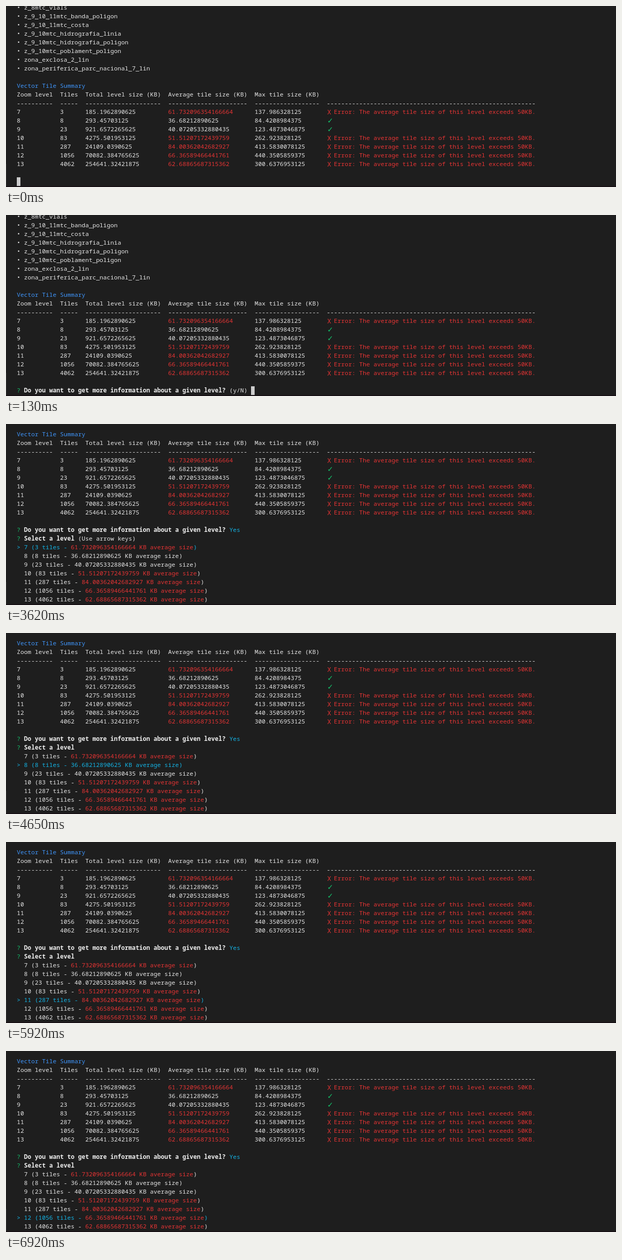
Animation of 1185x354 px, one loop 8000 ms. Source, as an HTML page with a canvas:

```html
<!DOCTYPE html>
<html lang="en">
<head>
<meta charset="utf-8">
<title>Vector Tile Summary</title>
<style>
  html, body { margin: 0; width: 100%; height: 100%; overflow: hidden; background: #1e1e1e; }
  canvas { display: block; }
</style>
</head>
<body>
<canvas id="term" width="1185" height="354"></canvas>
<script>
const ctx = document.getElementById('term').getContext('2d');
const LOOP = 8000, CELL = 7, LINE = 17, LEFT = 21, TOP = -5, BASE = 12;
const FONT = '11.667px "Noto Sans Mono", "DejaVu Sans Mono", monospace';
const C = { bg: '#1e1e1e', fg: '#e6e6e6', bold: '#eeeeee', red: '#e63434', green: '#14c46c',
            blue: '#3f95fa', cyan: '#14b4e6', cursor: '#cccccc', edge: '#181216', side: '#333333' };

const layers = ['z_8mtc_vials', 'z_9_10_11mtc_banda_poligon', 'z_9_10_11mtc_costa',
  'z_9_10mtc_hidrografia_linia', 'z_9_10mtc_hidrografia_poligon',
  'z_9_10mtc_poblament_poligon', 'zona_exclosa_2_lin', 'zona_periferica_parc_nacional_7_lin'];

const columns = [[0, 'Zoom level'], [12, 'Tiles'], [19, 'Total level size (KB)'],
  [42, 'Average tile size (KB)'], [66, 'Max tile size (KB)']];
const STATUS = 86;

// zoom, tiles, total, average, max
const levels = [
  '7 3 185.1962890625 61.732096354166664 137.986328125',
  '8 8 293.45703125 36.68212890625 84.4208984375',
  '9 23 921.6572265625 40.07205332880435 123.4873046875',
  '10 83 4275.501953125 51.51207172439759 262.923828125',
  '11 287 24109.0390625 84.00362042682927 413.5830078125',
  '12 1056 70082.384765625 66.36589466441761 440.3505859375',
  '13 4062 254641.32421875 62.68865687315362 300.6376953125'
].map(line => line.split(' '));

const PROMPT = 130, TYPED = 2750, MENU = 3620;
const moves = [4650, 5050, 5490, 5920, 6920];

const tooBig = level => Number(level[3]) > 50;

// Writes at a character cell and returns the column after the text.
function put(col, row, text, color = C.fg, weight = 500) {
  ctx.font = `${weight} ${FONT}`;
  ctx.fillStyle = color;
  ctx.fillText(text, LEFT + col * CELL, TOP + row * LINE + BASE);
  return col + text.length;
}

function cursor(col, row) {
  ctx.fillStyle = C.cursor;
  ctx.fillRect(LEFT + col * CELL, TOP + row * LINE, CELL, LINE);
}

// Status symbol, a little larger than the text.
function mark(row, symbol, color, font) {
  ctx.font = font;
  ctx.fillStyle = color;
  ctx.fillText(symbol, LEFT + STATUS * CELL + 1, TOP + row * LINE + BASE + 1);
}

function summary(row) {
  put(0, row, 'Vector Tile Summary', C.blue);
  for (const [col, name] of columns) {
    put(col, row + 1, name);
    put(col, row + 2, '-'.repeat(name.length));
  }
  put(STATUS, row + 2, '-'.repeat(58));
  levels.forEach((level, i) => {
    const y = row + 3 + i, big = tooBig(level);
    level.forEach((value, k) => put(columns[k][0], y, value, big && k === 3 ? C.red : C.fg));
    if (big) {
      mark(y, 'X', C.red, '13px "Noto Sans Mono", monospace');
      put(STATUS + 2, y, 'Error: The average tile size of this level exceeds 50KB.', C.red);
    } else mark(y, '✓', C.green, '14px "DejaVu Sans", sans-serif');
  });
}

function question(row, text) {
  put(0, row, '?', C.green);
  return put(2, row, text, C.bold, 700) + 1;
}

const askMore = row => question(row, 'Do you want to get more information about a given level?');

function menu(row, selected) {
  levels.forEach((level, i) => {
    const y = row + i, color = i === selected ? C.cyan : C.fg;
    if (i === selected) put(0, y, '>', color);
    let col = put(2, y, `${level[0]} (${level[1]} tiles - `, color);
    col = put(col, y, `${level[3]} KB average size`, tooBig(level) ? C.red : color);
    put(col, y, ')', color);
  });
}

function drawPrompt(t) {
  layers.forEach((name, i) => {
    put(0, i, '•');
    put(2, i, name);
  });
  summary(9);
  if (t < PROMPT) return cursor(0, 20);
  let col = put(askMore(20), 20, '(y/N)') + 1;
  if (t >= TYPED) col = put(col, 20, 'y');
  cursor(col, 20);
}

function drawMenu(t) {
  summary(1);
  put(askMore(12), 12, 'Yes', C.cyan);
  const selected = moves.filter(m => t >= m).length;
  const col = question(13, 'Select a level');
  if (!selected) put(col, 13, '(Use arrow keys)');
  menu(14, selected);
}

function draw(t) {
  ctx.fillStyle = C.bg;
  ctx.fillRect(0, 0, 1185, 354);
  ctx.fillStyle = C.side;
  ctx.fillRect(0, 309, 1, 43);
  ctx.fillStyle = C.edge;
  ctx.fillRect(0, 352, 1185, 2);
  (t < MENU ? drawPrompt : drawMenu)(t);
}

const start = performance.now();
function tick() {
  draw((performance.now() - start) % LOOP);
  requestAnimationFrame(tick);
}
tick();
</script>
</body>
</html>
```
